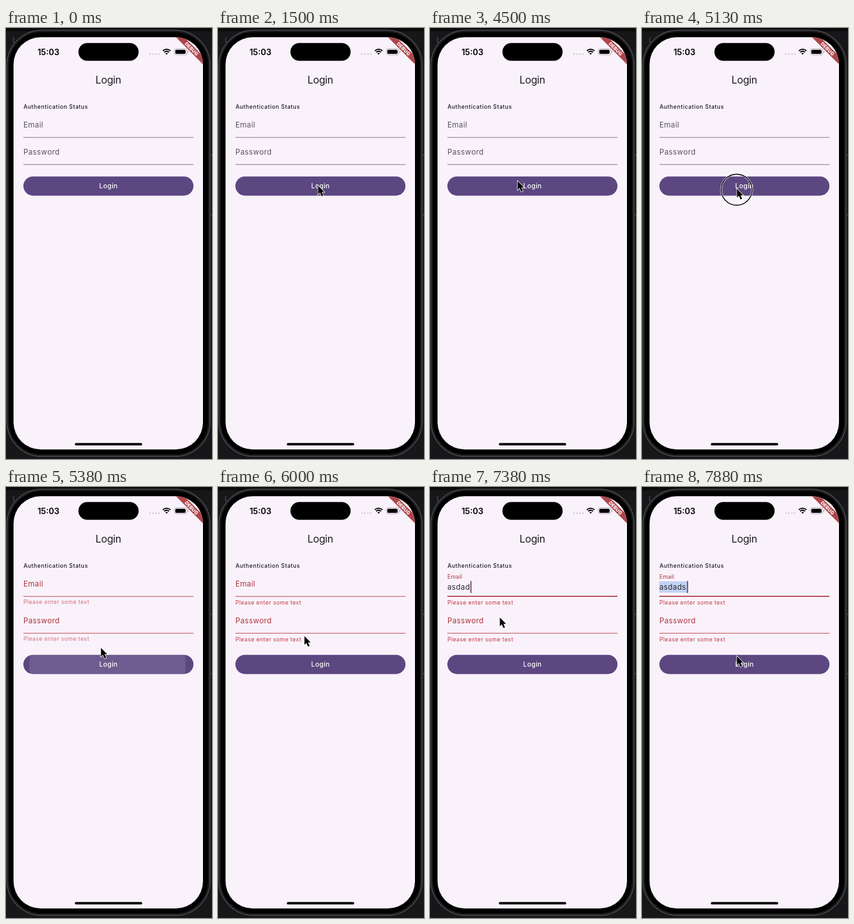
Animation of 320x667 px, one loop 8000 ms. Source, as an HTML page:

```html
<!DOCTYPE html>
<html lang="en">
<head>
<meta charset="utf-8">
<title>Login form</title>
<style>
html, body { margin: 0; width: 100%; height: 100%; overflow: hidden; background: #171618; }
svg { display: block; width: 320px; height: 667px; font-family: Inter, Roboto, sans-serif; }
.mid { text-anchor: middle; }
.field { font-size: 11.6px; letter-spacing: .35px; }
.error { font-size: 8.7px; letter-spacing: .4px; fill: #be3a43; }
</style>
</head>
<body>
<svg viewBox="0 0 320 667">
  <defs>
    <clipPath id="screenClip"><rect x="11.700" y="14.200" width="294.300" height="638" rx="42"/></clipPath>
    <clipPath id="buttonClip"><rect x="27" y="229.700" width="264.200" height="29.700" rx="14.850"/></clipPath>
  </defs>

  <!-- Phone body -->
  <rect width="320" height="667" fill="#171618"/>
  <rect width="320" height="5" fill="#0b0b0c"/>
  <path d="M12 14v9" stroke="#453f62" stroke-width="1.500"/>
  <path d="M318 197h2M318 289h2" stroke="#4a494d" stroke-width="1.500"/>
  <rect x="1.500" y="3.500" width="315.500" height="659.500" rx="54" fill="#000" stroke="#4d4c50" stroke-width="1.500"/>
  <rect x="3.500" y="5.500" width="311.500" height="655.500" rx="52" fill="none" stroke="#1d1c1f" stroke-width="2"/>

  <g clip-path="url(#screenClip)">
    <rect x="11" y="14" width="296" height="639" fill="#f9f2fb"/>

    <!-- Status bar -->
    <rect x="112.500" y="23.300" width="93.500" height="27.500" rx="13.750"/>
    <text x="66" y="41.700" class="mid" font-size="12.900" font-weight="600">15:03</text>
    <path d="M224 40.500h14" stroke="#bdb7be" stroke-width="2.200" stroke-linecap="round" stroke-dasharray="0 4.500"/>
    <g fill="none" stroke="#000" stroke-width="1.800">
      <path d="M243.600 35.300a8.300 8.300 0 0 1 11.800 0M245.700 37.600a5.300 5.300 0 0 1 7.600 0"/>
      <path d="M249.500 41.300l-1.900-1.900a2.700 2.700 0 0 1 3.800 0z" fill="#000" stroke="none"/>
    </g>
    <rect x="261.500" y="32.200" width="19.500" height="9.300" rx="3" fill="none" stroke="#aaa4ac" stroke-width=".9"/>
    <rect x="263" y="33.700" width="16" height="6.300" rx="1.800"/>
    <path d="M282.700 35.500v2.800" stroke="#aaa4ac" stroke-width="1.200"/>

    <!-- Corner ribbon -->
    <g transform="translate(306.300 14.300) rotate(45)">
      <rect x="-45" y="20.900" width="90" height="9" fill="#ad464b"/>
      <text y="28.100" class="mid" font-size="7.300" font-weight="800" letter-spacing=".15" fill="#fff">DEBUG</text>
    </g>

    <!-- Form -->
    <text x="159" y="86.200" class="mid" font-size="15.800" letter-spacing="-.3" fill="#1d1a20">Login</text>
    <text x="27.200" y="125" font-size="8.700" font-weight="500" letter-spacing=".52" fill="#1d1a20">Authentication Status</text>

    <rect id="selection" x="26.500" y="146" width="43.500" height="17.500" fill="#c2d2f4"/>
    <text id="typed" x="27" y="159.300" class="field" fill="#2b2730"></text>
    <rect id="caret" y="145.500" width="1.700" height="18.500"/>
    <text id="emailLabel" class="field">Email</text>
    <path id="emailLine" d="M27 169.300h264.300"/>
    <text id="emailError" x="27" class="error">Please enter some text</text>

    <g id="password">
      <text x="27" y="195.600" class="field">Password</text>
      <path id="passwordLine" d="M27 211.300h264.300"/>
    </g>
    <text id="passwordError" x="27" class="error">Please enter some text</text>

    <g id="button">
      <g clip-path="url(#buttonClip)">
        <rect x="27" y="229" width="265" height="31" fill="#5c4781"/>
        <circle id="ripple" cx="157.500" cy="244.600" fill="#fff"/>
      </g>
      <text x="159.200" y="248.300" class="mid" font-size="10.300" font-weight="500" letter-spacing=".35" fill="#fff">Login</text>
    </g>

    <rect x="107" y="642.300" width="104.500" height="3.700" rx="1.850"/>
  </g>

  <!-- Pointer -->
  <g id="pointer">
    <g id="ring" fill="none">
      <circle cy="2.200" r="24" stroke="#fff" stroke-width="2.800"/>
      <circle cy="2.200" r="24" stroke="#000" stroke-width="1.400"/>
    </g>
    <path d="M0 0V16.400l3.700-3.500 3 7 3.100-1.300-3-6.800h5z" transform="translate(.5 1) scale(.82)" stroke="#fff" stroke-width="1.800" paint-order="stroke"/>
  </g>
</svg>
<script>
const LOOP = 8000, STEP = 125;
const WORD = 'asdads', FIRST_KEY = 6875, SELECT_AT = 7625;
const ERROR_AT = 5375, FOCUS_AT = 6625;
const $ = id => document.getElementById(id);
const ramp = (t, from, to) => Math.min(1, Math.max(0, (t - from) / (to - from)));
const mix = (a, b, k) => a + (b - a) * k;
const set = (id, attrs) => {
  for (const name in attrs) $(id).setAttribute(name, attrs[name]);
};
const show = (id, on) => set(id, { visibility: on ? 'visible' : 'hidden' });

// Pointer stops: time, x, y
const path = [
  [1000, 190, 310], [1250, 165, 260], [1500, 155, 243], [3375, 155, 243],
  [3500, 124, 211], [3750, 118, 205], [4125, 132, 232], [4375, 132, 232],
  [4875, 147, 248], [5875, 147, 248], [6500, 81, 157], [7125, 81, 157],
  [7625, 135, 245], [7875, 147, 261]
];

function pointerAt(t) {
  const next = path.findIndex(p => p[0] >= t);
  if (next < 0) return path[path.length - 1].slice(1);
  if (next === 0) return path[0].slice(1);
  const a = path[next - 1], b = path[next], k = ramp(t, a[0], b[0]);
  return [mix(a[1], b[1], k), mix(a[2], b[2], k)];
}

function drawForm(t) {
  const failed = t >= ERROR_AT, focused = t >= FOCUS_AT;
  const reveal = failed ? mix(.7, 1, ramp(t, ERROR_AT, ERROR_AT + STEP)) : 0;
  const lift = ramp(t, FOCUS_AT, FOCUS_AT + STEP);
  const labelColor = failed ? '#ab343c' : '#59535d';
  const lineColor = failed ? '#b8414a' : '#77707a';

  set('emailLabel', {
    transform: `translate(27 ${mix(153.6, 142, lift)}) scale(${mix(1, .75, lift)})`,
    fill: labelColor
  });
  set('emailLine', {
    stroke: focused ? '#a52b34' : lineColor,
    'stroke-width': mix(.9, 1.6, lift)
  });
  set('password', { transform: `translate(0 ${failed ? 15 : 0})`, fill: labelColor });
  set('passwordLine', { stroke: lineColor, 'stroke-width': .9 });
  set('emailError', { y: mix(178.5, 182, reveal), opacity: reveal });
  set('passwordError', { y: mix(235.5, 239, reveal), opacity: reveal });
  set('button', { transform: `translate(0 ${failed ? 30 : 0})` });
  set('ripple', {
    r: mix(0, 121.5, ramp(t, 5125, ERROR_AT)) + 30 * ramp(t, ERROR_AT, 5500),
    opacity: .11 * (1 - ramp(t, 5500, 5750))
  });

  const count = Math.max(0, Math.floor((t - FIRST_KEY) / STEP) + 1);
  $('typed').textContent = WORD.slice(0, count);
  show('selection', t >= SELECT_AT);
  show('caret', focused);
  set('caret', {
    x: 27.2 + Math.min(count, WORD.length) * 7.1,
    fill: count ? '#643a62' : '#9b303a'
  });
}

function draw(now) {
  const t = Math.floor(now % LOOP / STEP) * STEP;
  drawForm(t);
  show('pointer', t >= path[0][0]);
  set('pointer', { transform: `translate(${pointerAt(t)})` });
  set('ring', { opacity: t >= 5000 && t < 5250 || t === 6500 ? 1 : 0 });
}

const start = performance.now();
function tick() {
  draw(performance.now() - start);
  requestAnimationFrame(tick);
}
tick();
</script>
</body>
</html>
```
